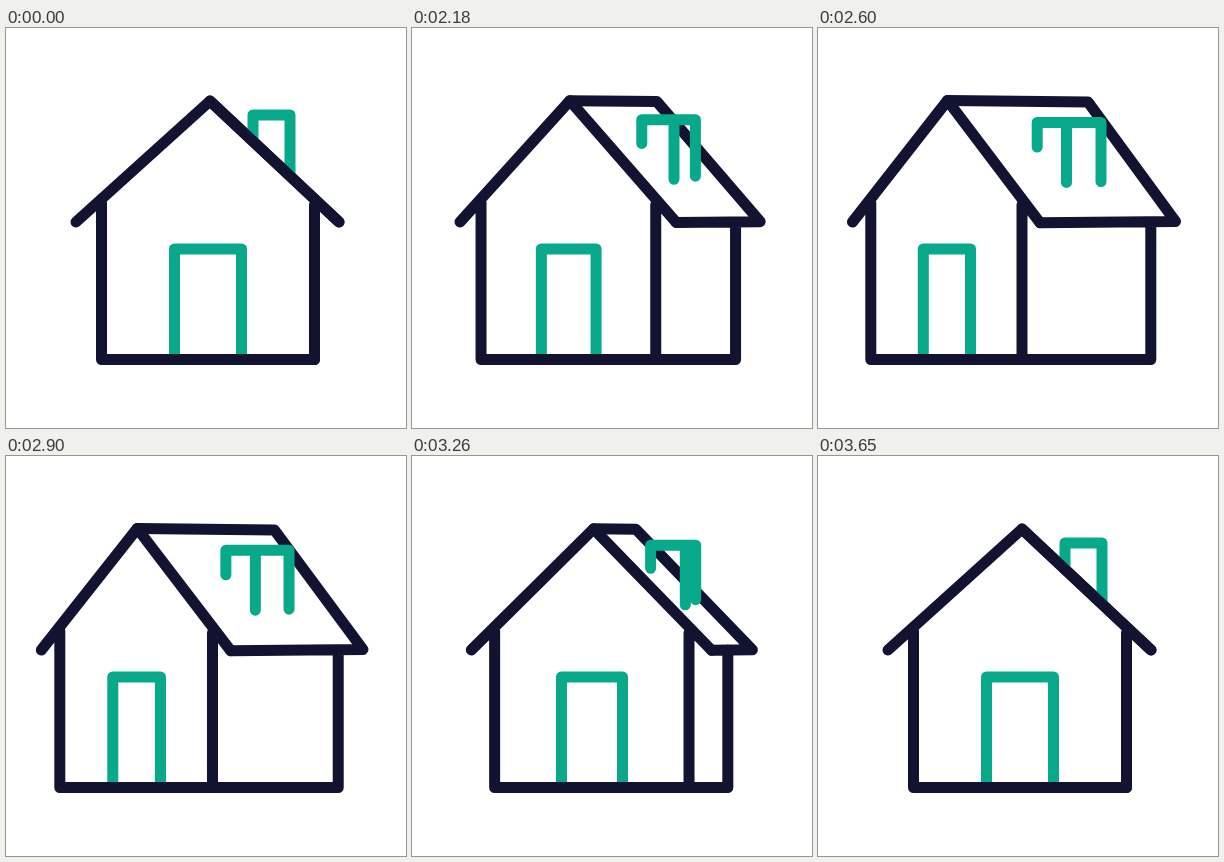
Write an HTML page that moves like this. It is 400 px wide and 400 px high and loops after 5.69 s.

```html
<!DOCTYPE html>
<html lang="en">
<head>
<meta charset="utf-8">
<title>Turning house</title>
<style>
  html, body { margin: 0; height: 100%; overflow: hidden; background: #fff; }
  svg { display: block; width: 100%; height: 100%; }
  path { fill: none; stroke: #121331; stroke-width: 11; stroke-linecap: round; stroke-linejoin: round; }
  .green { stroke: #08a88a; }
</style>
</head>
<body>
<svg viewBox="0 0 400 400">
  <path id="back"/>
  <path id="chimney" class="green"/>
  <path id="door" class="green"/>
  <path id="front"/>
</svg>
<script>
const LOOP = 5690, STEP = 30, START = 2030;
const [back, chimney, door, front] =
  ['back', 'chimney', 'door', 'front'].map(id => document.getElementById(id));

// Cubic Bezier easing, solved for x by bisection.
function bezier(x1, y1, x2, y2) {
  const at = (a, b, t) => 3 * a * t * (1 - t) ** 2 + 3 * b * t * t * (1 - t) + t ** 3;
  return x => {
    if (x <= 0) return 0;
    if (x >= 1) return 1;
    let lo = 0, hi = 1;
    for (let i = 0; i < 24; i++) {
      const mid = (lo + hi) / 2;
      if (at(x1, x2, mid) < x) lo = mid; else hi = mid;
    }
    return at(y1, y2, lo);
  };
}
const open = bezier(.2, .25, .28, 1);
const close = bezier(.7, 0, .3, 1);

// Turn of the house: 0 is the front view, 1 the full side view.
function turn(ms) {
  if (ms < START) return 0;
  const t = START + Math.floor((ms - START) / STEP) * STEP;
  return open((t - 2000) / 560) - close((t - 2750) / 900);
}

const line = (...points) => 'M' + points.map(p => p.join(' ')).join('L');

function draw(s) {
  const apex = [204 - 74.5 * s, 73 - .5 * s];
  const ridgeEnd = [204 + 66 * s, 73 + s];
  const eaveLeft = [70 - 35.5 * s, 194];
  const eaveMid = [333 - 111 * s, 194 + .7 * s];
  const eaveRight = [333 + 24.5 * s, 194 - .5 * s];
  const wallLeft = 95.5 - 42.7 * s;
  const wallMid = 308.5 - 104.5 * s;
  const wallRight = 308.5 + 24.3 * s;
  const base = 331.5;

  back.setAttribute('d',
    line(apex, ridgeEnd, eaveRight, eaveMid) +
    line([wallRight, 194], [wallRight, base], [wallMid, base]));

  const top = 87 + 7.5 * s, left = 247 - 27.8 * s, mid = 284 - 35.5 * s, right = 284 - s;
  chimney.setAttribute('d',
    line([left, 109.5 + 9.5 * s], [left, top], [right, top], [right, 139.5 + 14 * s]) +
    line([mid, top], [mid, 146.4 + 8 * s]));

  const doorLeft = 168.5 - 63.2 * s, doorRight = 235.5 - 83 * s;
  door.setAttribute('d',
    line([doorLeft, base - 4], [doorLeft, 221], [doorRight, 221], [doorRight, base - 4]));

  front.setAttribute('d',
    line(eaveLeft, apex, eaveMid) +
    line([wallLeft, 175], [wallLeft, base], [wallMid, base], [wallMid, 177]));
}

function frame() {
  draw(turn(performance.now() % LOOP));
  requestAnimationFrame(frame);
}
frame();
</script>
</body>
</html>
```
